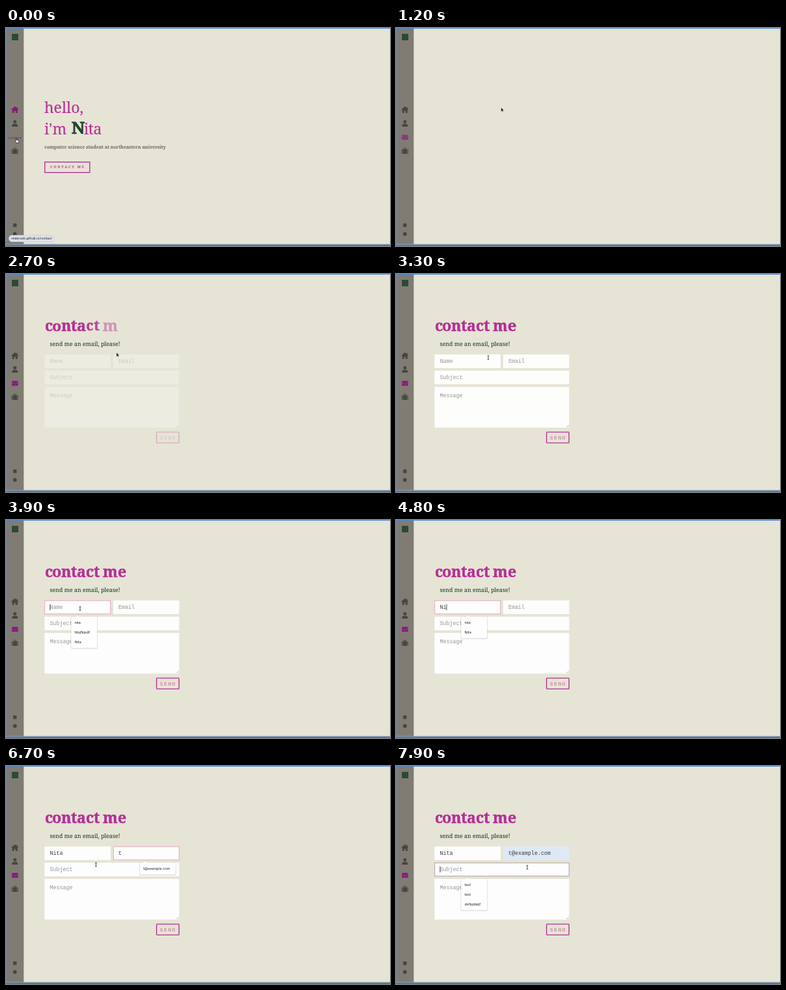
Animation of 591x336 px, one loop 8000 ms. Source, as an HTML page:

```html
<!DOCTYPE html>
<html lang="en">
<head>
<meta charset="utf-8">
<title>Contact page</title>
<style>
html, body { margin: 0; width: 100%; height: 100%; overflow: hidden; background: #e6e4d5; }
svg { position: absolute; left: 0; top: 0; display: block; }
.slab { font-family: "Noto Serif", "Liberation Serif", serif; }
.mono { font-family: "Liberation Mono", monospace; font-size: 8.35px; }
.ui { font-family: Inter, "Liberation Sans", sans-serif; }
.hint { fill: #969696; }
.typed { fill: #3b3b3b; }
.field { fill: #fdfdfd; }
.frame { fill: none; stroke: #b4309a; stroke-width: 1.4; }
.big { font-size: 23px; fill: #b83298; stroke: #b83298; stroke-width: .2; }

h1 {
  position: absolute; left: 59.5px; top: 68.4px; margin: 0;
  font-size: 23.2px; font-weight: 700; line-height: 1; letter-spacing: -.4px;
  color: #b42f96; white-space: pre; -webkit-text-stroke: .5px #b42f96;
}
h1 span {
  display: inline-block; white-space: pre;
  animation: bounce 8s cubic-bezier(.215, .61, .355, 1) calc(1.8s + var(--i) * .1s) infinite backwards;
}

.home { animation: leave 8s linear infinite; }
.page { animation: enter 8s ease infinite; }
.form { animation: form 8s ease infinite; }
.house { animation: house 8s linear infinite; }
.mail { animation: mail 8s ease-out infinite; }
.label { animation: label 8s ease-out infinite; }
.tip { animation: tip 8s linear infinite; }

@keyframes leave { 0%, 2.49% { opacity: 1 } 2.5%, 100% { opacity: 0 } }
@keyframes enter { 0%, 15% { opacity: 0 } 27.5%, 100% { opacity: 1 } }
@keyframes form { 0%, 31.25% { opacity: 0 } 43.75%, 100% { opacity: 1 } }
@keyframes house { 0%, 2.49% { fill: #86197a } 2.5%, 100% { fill: #454641 } }
@keyframes mail { 0%, 13.2% { opacity: 0 } 17%, 100% { opacity: 1 } }
@keyframes label { 0%, 13.2% { opacity: 1 } 17%, 100% { opacity: 0 } }
@keyframes tip { 0%, 13.1% { opacity: 1 } 13.11%, 100% { opacity: 0 } }
@keyframes bounce {
  0% { opacity: 0; transform: scale(.3) }
  2.5% { transform: scale(1.1) }
  5% { transform: scale(.9) }
  7.5% { opacity: 1; transform: scale(1.03) }
  10% { transform: scale(.97) }
  12.5%, 80% { opacity: 1; transform: none }
  80.01%, 100% { opacity: 0 }
}
</style>
</head>
<body>
<svg width="591" height="336" viewBox="0 0 591 336">
  <rect width="591" height="336" fill="#e6e4d5"/>
  <rect width="27.3" height="336" fill="#807c73"/>

  <!-- sidebar -->
  <rect x="9" y="9" width="10" height="10" fill="#2b4a36"/>
  <g fill="#454641">
    <path class="house" d="M13.7 120.8 8 125.8l.7.8 1-.8v5.2h2.9v-3.2h2.2v3.2h2.9v-5.2l1 .8.7-.8-1.7-1.5v-2.5h-1.4v1.3z"/>
    <circle cx="13.7" cy="144.6" r="2.5"/>
    <path d="M9.2 152v-1.1c0-1.9 1.4-3.1 3-3.1h3c1.6 0 3 1.2 3 3.1v1.1z"/>
    <path d="M8.7 187h1.2v7H9.7q-1 0-1-1zM18.7 187h-1.2v7h.2q1 0 1-1zM10.6 187h.9v-1.3q0-.9.9-.9H15q.9 0 .9.9v1.3h.9v7h-6.2zM12.5 187h2.4v-1.2h-2.4z" fill-rule="evenodd"/>
    <rect x="11" y="301.3" width="5.4" height="5.4"/>
    <circle cx="13.7" cy="317.4" r="2.9"/>
  </g>
  <g class="mail">
    <rect x="9" y="164.8" width="9.6" height="7.4" rx="1" fill="#86197a"/>
    <path d="M9 167l4.8 3 4.8-3" fill="none" stroke="#9a5b8c" stroke-width=".7"/>
  </g>
  <text class="label slab" x="13.8" y="171.2" text-anchor="middle" font-size="4.2" font-weight="700" fill="#8f1f80">CONTACT</text>

  <!-- home -->
  <g class="home slab">
    <text class="big" x="59" y="131">hello,</text>
    <text class="big" x="59" y="164">i'm</text>
    <text x="100" y="162" font-size="26" font-weight="700" fill="#8d9b89">N</text>
    <text x="101" y="163" font-size="26" font-weight="700" fill="#23452f" stroke="#23452f" stroke-width=".6">N</text>
    <text class="big" x="120" y="164" letter-spacing="-.5">ita</text>
    <text x="59.3" y="186" font-size="6.9" font-weight="700" letter-spacing=".05" fill="#77736a" stroke="#77736a" stroke-width=".15">computer science student at northeastern university</text>
    <rect class="frame" x="59.7" y="206.6" width="69.2" height="16.1"/>
    <text x="68" y="216" font-size="5.4" font-weight="600" letter-spacing="1.75" fill="#b83298">CONTACT ME</text>
  </g>
  <g class="tip">
    <rect x="4.5" y="319.5" width="69.5" height="10" rx="4.5" fill="#dee3ea" stroke="#c3c7cc" stroke-width=".6"/>
    <text class="ui" x="8" y="326.3" font-size="4.85" font-weight="500" fill="#3a3d42">nitabrusk.github.io/contact</text>
  </g>

  <!-- contact -->
  <g class="page">
    <text class="slab" x="67.5" y="111" font-size="8.67" letter-spacing=".09" fill="#234430" stroke="#234430" stroke-width=".1">send me an email, please!</text>
    <g class="form mono">
      <rect class="field" x="59.3" y="124" width="101.7" height="21"/>
      <rect class="field" id="mailBox" x="165" y="124" width="101.5" height="21"/>
      <rect class="field" x="59.3" y="149" width="207.2" height="21"/>
      <rect class="field" x="59.3" y="174" width="207.2" height="62.7"/>
      <path d="M262.5 236l3.3-3.3M264.5 236l1.3-1.3" stroke="#8a8a8a" stroke-width=".6"/>
      <text id="name" x="67.5" y="137"></text>
      <text id="email" x="173" y="137"></text>
      <text class="hint" x="67.5" y="162">Subject</text>
      <text class="hint" x="67.5" y="189.5">Message</text>
      <rect class="frame" x="231.7" y="243.6" width="34.6" height="16.8" rx="1.2"/>
      <text x="236.8" y="254.7" letter-spacing="1.55" fill="#bd7188" style="font-size:8px">SEND</text>
    </g>
  </g>
  <rect id="focus" height="20.4" fill="none" stroke-width=".9"/>
  <rect id="caret" width=".8" height="9.4" fill="#222"/>
  <g id="menu" class="ui" font-size="5.4" fill="#202020"></g>

  <!-- window edge -->
  <rect width=".7" height="336" fill="#6f87a8"/>
  <rect width="591" height="1" fill="#4a86d2"/>
  <rect y="332.8" width="591" height="1" fill="#a9a69b"/>
  <rect y="333.8" width="591" height="2.2" fill="#3f7cc6"/>

  <!-- pointers, hot spot at 0,0 -->
  <g id="pointer">
    <path id="arrow" d="M0 0V6.6L1.5 5.2 2.5 7.5 3.5 7.1 2.5 4.8H4.6z" fill="#111" stroke="#f4f4f4" stroke-width=".5"/>
    <path id="beam" d="M-1.4-3.1Q0-3 0-2.2 0-3 1.4-3.1M0-2.4V2.4M-1.4 3.1Q0 3 0 2.2 0 3 1.4 3.1" fill="none" stroke="#222" stroke-width=".8"/>
    <path id="hand" d="M-.7-.4q.7-.7 1.3 0V2.2l2.4.5q.9.3.9 1.2L3.4 6.6H.2L-2 3.9q0-1 1.3-.3z" fill="#fff" stroke="#111" stroke-width=".7"/>
  </g>
</svg>
<h1 class="slab page" id="title"></h1>

<script>
const LOOP = 8000;
const $ = id => document.getElementById(id);
const set = (el, attrs) => { for (const k in attrs) el.setAttribute(k, attrs[k]); };
const show = (el, on) => el.setAttribute("visibility", on ? "inherit" : "hidden");
const last = (list, t) => list.filter(item => item[0] <= t).pop();

[..."contact me"].forEach((ch, i) => {
  const span = document.createElement("span");
  span.textContent = ch;
  span.style.setProperty("--i", i);
  $("title").append(span);
});

// time, x, y
const path = [
  [0, 16, 170.5], [900, 16, 170.5], [1200, 161.7, 122.5], [2000, 165, 123],
  [2700, 170, 121], [3100, 170, 121], [3500, 114, 136.5], [6400, 114, 136.5],
  [6700, 138.5, 152], [7050, 228, 158], [7230, 228, 158], [7480, 202, 156], [LOOP, 202, 156]
];
const shapes = [[0, "hand"], [950, "arrow"], [3300, "beam"], [4450, ""], [6420, "beam"], [6930, "arrow"], [7280, "beam"]];
const names = [[0, ""], [4500, "N"], [4700, "Ni"], [4850, "Nit"], [5000, "Nita"]];
const emails = [[0, ""], [6150, "t"], [7200, "t@example.com"]];

// time, box x, y, width, stroke, text x
const focuses = [
  [3600, 59.7, 124.3, 101, "#eb9dbd", 67.5],
  [5250, 165.4, 124.3, 101, "#eb9dbd", 173],
  [7500, 59.7, 149.3, 206.6, "#aa9c98", 67.5]
];
// time, x, y, width, pointer x, items
const menus = [
  [0], [3700, 100.3, 148.8, 40, 110, ["nita", "fdsjfkjsdf", "Nita"]],
  [4500, 100.3, 148.8, 40, 110, ["nita", "Nita"]], [5000],
  [6250, 206, 148.8, 55, 214.5, ["t@example.com"]], [7200],
  [7600, 100.3, 173.8, 40, 110, ["test", "test", "dsfkjdskjf"]]
];

function place(t) {
  const i = path.findIndex((p, n) => n && t <= p[0]);
  const [a, b] = [path[i - 1], path[i]];
  const u = (t - a[0]) / (b[0] - a[0]);
  const e = u * u * (3 - 2 * u);
  return [a[1] + (b[1] - a[1]) * e, a[2] + (b[2] - a[2]) * e];
}

function fill(id, value, hint) {
  set($(id), { class: value ? "typed" : "hint" });
  $(id).textContent = value || hint;
}

let openMenu;
function drawMenu(menu) {
  if (menu === openMenu) return;
  openMenu = menu;
  const [, x, y, w, tip, items] = menu;
  if (!items) { $("menu").innerHTML = ""; return; }
  const h = items.length * 15 + 3.4;
  const box = `M${x + 2} ${y}H${tip - 2.5}l2.5-2.5 2.5 2.5H${x + w - 2}q2 0 2 2v${h - 4}q0 2-2 2H${x + 2}q-2 0-2-2v${4 - h}q0-2 2-2z`;
  $("menu").innerHTML =
    `<path d="${box}" transform="translate(0 .6)" fill="none" stroke="#0002" stroke-width="1.6"/>` +
    `<path d="${box}" fill="#fefefe"/>` +
    items.map((s, i) => `<text x="${x + 5.2}" y="${y + 11 + i * 15}">${s}</text>`).join("");
}

function render(t) {
  const [x, y] = place(t);
  set($("pointer"), { transform: `translate(${x} ${y})` });
  const shape = last(shapes, t)[1];
  for (const id of ["arrow", "beam", "hand"]) show($(id), id === shape);

  const name = last(names, t), email = last(emails, t);
  fill("name", name[1], "Name");
  fill("email", email[1], "Email");
  $("mailBox").style.fill = t >= 7200 ? "#dfe9f6" : "";

  const focus = last(focuses, t);
  show($("focus"), focus);
  show($("caret"), false);
  if (focus) {
    const [since, fx, fy, w, stroke, tx] = focus;
    set($("focus"), { x: fx, y: fy, width: w, stroke });
    const entry = [name, email, [0, ""]][focuses.indexOf(focus)];
    const idle = t - Math.max(since, entry[0]);
    set($("caret"), { x: tx + entry[1].length * 5.01, y: fy + 5.4 });
    show($("caret"), idle % 1000 < 500);
  }
  drawMenu(last(menus, t));
}

let start;
function tick(now) {
  start ??= now;
  render((now - start) % LOOP);
  requestAnimationFrame(tick);
}
render(0);
requestAnimationFrame(tick);
</script>
</body>
</html>
```
